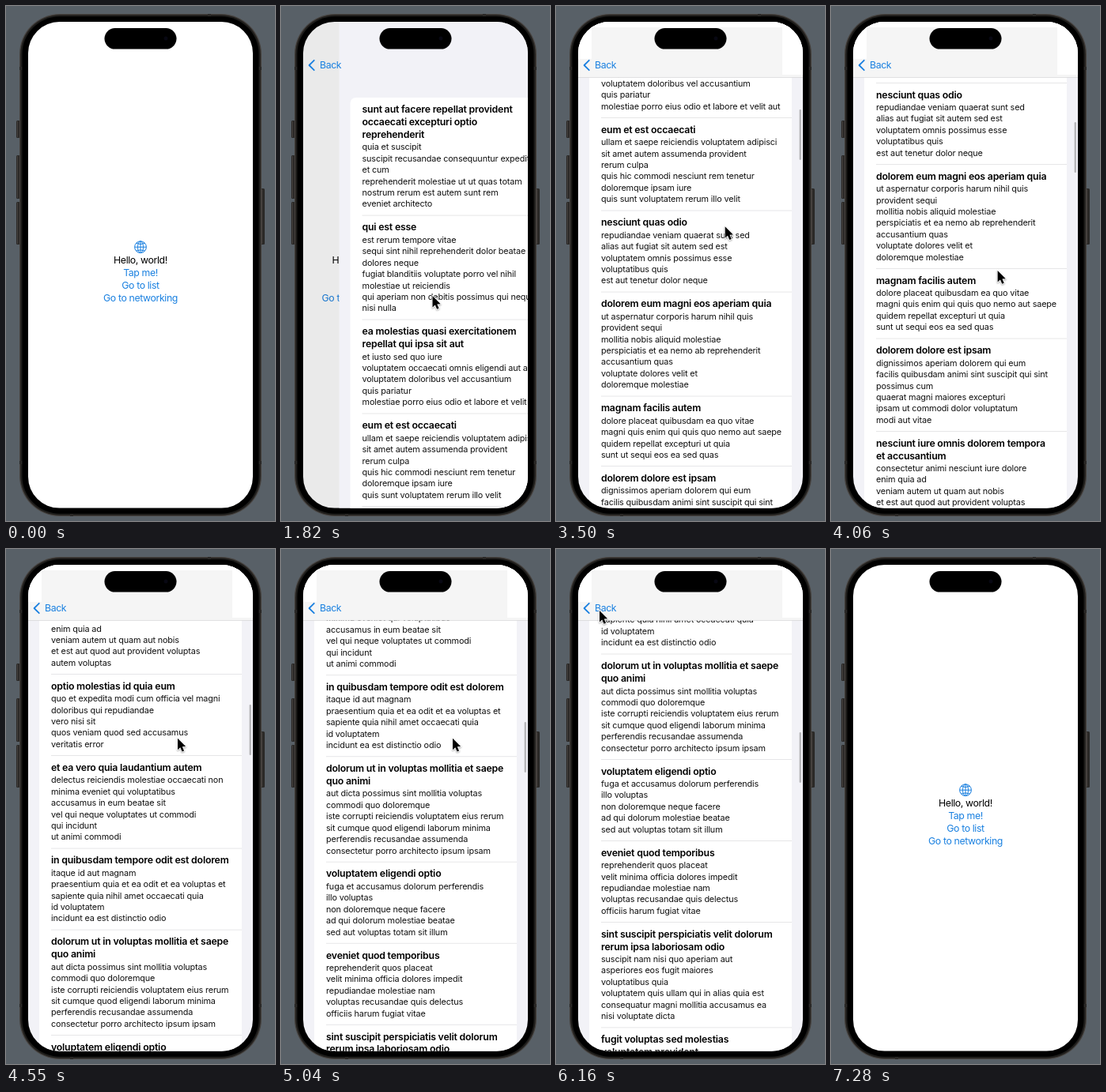
These frames come from a looping animation (340 px wide and 652 px high, 8050 ms). An HTML page with a canvas:

```html
<!DOCTYPE html>
<html lang="en">
<head>
<meta charset="utf-8">
<title>List demo</title>
<style>
html, body { margin: 0; width: 100%; height: 100%; overflow: hidden; background: #586067; }
canvas { display: block; width: 340px; height: 652px; }
</style>
</head>
<body>
<canvas id="stage" width="340" height="652"></canvas>
<script>
const ctx = document.getElementById('stage').getContext('2d');
const LOOP = 8050, STEP = 70;
const LEFT = 28, TOP = 20, WIDTH = 284, HEIGHT = 615.7;
const BLUE = '#1a80e0', GROUPED = '#f2f2f7';
const FACE = 'Inter, Roboto, sans-serif';
const FONT = {
  label: { font: `400 12.3px ${FACE}`, track: '-0.38px' },
  head: { font: `600 12.3px ${FACE}`, track: '-0.2px' },
  body: { font: `400 10.85px ${FACE}`, track: '-0.15px' }
};
const HEAD_LINE = 15.9, BODY_LINE = 14.45, ROW_PAD = 14.9, FIRST_ROW = 131;

// title lines : body lines
const rows = `sunt aut facere repellat provident/occaecati excepturi optio/reprehenderit:quia et suscipit/suscipit recusandae consequuntur expedita/et cum/reprehenderit molestiae ut ut quas totam/nostrum rerum est autem sunt rem/eveniet architecto
qui est esse:est rerum tempore vitae/sequi sint nihil reprehenderit dolor beatae ea/dolores neque/fugiat blanditiis voluptate porro vel nihil/molestiae ut reiciendis/qui aperiam non debitis possimus qui neque/nisi nulla
ea molestias quasi exercitationem/repellat qui ipsa sit aut:et iusto sed quo iure/voluptatem occaecati omnis eligendi aut ad/voluptatem doloribus vel accusantium/quis pariatur/molestiae porro eius odio et labore et velit aut
eum et est occaecati:ullam et saepe reiciendis voluptatem adipisci/sit amet autem assumenda provident/rerum culpa/quis hic commodi nesciunt rem tenetur/doloremque ipsam iure/quis sunt voluptatem rerum illo velit
nesciunt quas odio:repudiandae veniam quaerat sunt sed/alias aut fugiat sit autem sed est/voluptatem omnis possimus esse/voluptatibus quis/est aut tenetur dolor neque
dolorem eum magni eos aperiam quia:ut aspernatur corporis harum nihil quis/provident sequi/mollitia nobis aliquid molestiae/perspiciatis et ea nemo ab reprehenderit/accusantium quas/voluptate dolores velit et/doloremque molestiae
magnam facilis autem:dolore placeat quibusdam ea quo vitae/magni quis enim qui quis quo nemo aut saepe/quidem repellat excepturi ut quia/sunt ut sequi eos ea sed quas
dolorem dolore est ipsam:dignissimos aperiam dolorem qui eum/facilis quibusdam animi sint suscipit qui sint/possimus cum/quaerat magni maiores excepturi/ipsam ut commodi dolor voluptatum/modi aut vitae
nesciunt iure omnis dolorem tempora/et accusantium:consectetur animi nesciunt iure dolore/enim quia ad/veniam autem ut quam aut nobis/et est aut quod aut provident voluptas/autem voluptas
optio molestias id quia eum:quo et expedita modi cum officia vel magni/doloribus qui repudiandae/vero nisi sit/quos veniam quod sed accusamus/veritatis error
et ea vero quia laudantium autem:delectus reiciendis molestiae occaecati non/minima eveniet qui voluptatibus/accusamus in eum beatae sit/vel qui neque voluptates ut commodi/qui incidunt/ut animi commodi
in quibusdam tempore odit est dolorem:itaque id aut magnam/praesentium quia et ea odit et ea voluptas et/sapiente quia nihil amet occaecati quia/id voluptatem/incidunt ea est distinctio odio
dolorum ut in voluptas mollitia et saepe/quo animi:aut dicta possimus sint mollitia voluptas/commodi quo doloremque/iste corrupti reiciendis voluptatem eius rerum/sit cumque quod eligendi laborum minima/perferendis recusandae assumenda/consectetur porro architecto ipsum ipsam
voluptatem eligendi optio:fuga et accusamus dolorum perferendis/illo voluptas/non doloremque neque facere/ad qui dolorum molestiae beatae/sed aut voluptas totam sit illum
eveniet quod temporibus:reprehenderit quos placeat/velit minima officia dolores impedit/repudiandae molestiae nam/voluptas recusandae quis delectus/officiis harum fugiat vitae
sint suscipit perspiciatis velit dolorum/rerum ipsa laboriosam odio:suscipit nam nisi quo aperiam aut/asperiores eos fugit maiores/voluptatibus quia/voluptatem quis ullam qui in alias quia est/consequatur magni mollitia accusamus ea/nisi voluptate dicta
fugit voluptas sed molestias/voluptatem provident:eos voluptas et aut odit natus earum/aspernatur fuga molestiae ullam`
  .split('\n').map(row => row.split(':').map(part => part.split('/')));

let nextTop = FIRST_ROW;
const list = rows.map(([head, body]) => {
  const top = nextTop;
  const height = head.length * HEAD_LINE + body.length * BODY_LINE + ROW_PAD;
  nextTop += height;
  return { head, body, top, height };
});

const clamp = v => Math.max(0, Math.min(1, v));
const mix = (a, b, u) => a + (b - a) * u;
const linear = u => u;
const smooth = u => u * u * (3 - 2 * u);
const easeOut = u => 1 - (1 - u) ** 2.2;
const flick = u => u ** 1.7;
const spring = ms => {
  const u = Math.max(0, ms) * 0.0155;
  return 1 - (1 + u) * Math.exp(-u);
};

// Pointer stops: time, x, y, easing of the move that ends there
const stops = [
  [210, 172, 656, linear],
  [1120, 191.5, 367, easeOut],
  [2520, 191.5, 367, linear],
  [2730, 183, 466, smooth],
  [2870, 183, 466, linear],
  [3130, 213.7, 279.3, linear],
  [3560, 213.7, 279.3, linear],
  [3900, 207, 389, smooth],
  [3950, 207, 389, linear],
  [4150, 217, 239.7, flick],
  [5080, 217, 239.7, linear],
  [5530, 92, 139, smooth],
  [5950, 55, 78, easeOut],
  [6510, 55, 78, linear],
  [7070, 135, 299, u => u * u],
  [7280, 201, 660, linear]
];

function pointerAt(t) {
  const i = stops.findIndex(s => s[0] > t);
  if (i < 1) return null;
  const [t0, x0, y0] = stops[i - 1], [t1, x1, y1, ease] = stops[i];
  const u = ease((t - t0) / (t1 - t0));
  return [mix(x0, x1, u), mix(y0, y1, u)];
}

const glide = (from, reach, ms) => from + reach * (1 - Math.exp(-ms / 540));

function scrollAt(t) {
  if (t < 2870) return 0;
  if (t < 3130) return 187 * (t - 2870) / 260;
  if (t < 3950) return glide(187, 378, t - 3130);
  if (t < 4150) return mix(482, 631.4, flick((t - 3950) / 200));
  return glide(631.4, 771.4, t - 4150);
}

// 0 is the home page, 1 the list page
function pageAt(t) {
  if (t < 1820) return 0;
  if (t < 6300) return spring(t - 1820 + 212);
  return 1 - spring(t - 6300 + 40);
}

function round(x, y, w, h, r, fill) {
  ctx.beginPath();
  ctx.roundRect(x, y, w, h, r);
  ctx.fillStyle = fill;
  ctx.fill();
}

function rect(x, y, w, h, fill) {
  ctx.fillStyle = fill;
  ctx.fillRect(x, y, w, h);
}

function text(str, x, y, style, fill, align = 'left') {
  ctx.font = style.font;
  ctx.letterSpacing = style.track;
  ctx.textAlign = align;
  ctx.fillStyle = fill;
  ctx.fillText(str, x, y);
}

function drawBody() {
  rect(0, 0, 340, 652, '#586067');
  const key = (x, y, h) => {
    round(x, y, 5, h, 1.5, '#2b2927');
    rect(x + 1, y + 1, 1, h - 2, '#45413e');
  };
  key(13, 145, 22);
  key(13, 189, 55);
  key(13, 248, 54);
  key(322, 231, 71);
  round(17, 10, 306, 636, 51, '#45413e');
  round(18.3, 11.2, 303.4, 633.6, 50, '#1e1d1b');
  for (const y of [77, 576]) {
    rect(17, y, 4, 4, '#2a2826');
    rect(319, y, 4, 4, '#2a2826');
  }
  rect(255, 10, 4, 3, '#2a2826');
  rect(81, 643, 4, 3, '#2a2826');
  round(20.5, 13.3, 299, 629.4, 47.5, '#000');
}

function drawGlobe(x, y) {
  const r = 7.4;
  ctx.strokeStyle = BLUE;
  ctx.lineWidth = 1;
  ctx.beginPath();
  ctx.arc(x, y, r, 0, Math.PI * 2);
  ctx.moveTo(x + 3.5, y);
  ctx.ellipse(x, y, 3.5, r, 0, 0, Math.PI * 2);
  ctx.moveTo(x, y - r);
  ctx.lineTo(x, y + r);
  ctx.moveTo(x - r, y);
  ctx.lineTo(x + r, y);
  for (const d of [-1, 1]) {
    ctx.moveTo(x - 5.6, y + d * 4.8);
    ctx.quadraticCurveTo(x, y + d * 2.6, x + 5.6, y + d * 4.8);
  }
  ctx.stroke();
}

function drawHome(page) {
  const x = 170 - page * WIDTH * 0.3;
  rect(LEFT, TOP, WIDTH, HEIGHT, '#fff');
  drawGlobe(x, 305.2);
  ['Hello, world!', 'Tap me!', 'Go to list', 'Go to networking'].forEach((str, i) =>
    text(str, x, 326.2 + i * 16, FONT.label, i ? BLUE : '#000', 'center'));
  rect(LEFT, TOP, WIDTH, HEIGHT, `rgba(0,0,0,${page * 0.1})`);
}

function drawRow(row, y) {
  row.head.forEach((line, i) => text(line, 57, y + 4.1 + i * HEAD_LINE, FONT.head, '#000'));
  const first = y + row.head.length * HEAD_LINE + 3.5;
  row.body.forEach((line, i) => text(line, 57, first + i * BODY_LINE, FONT.body, '#111'));
  rect(57, y + row.height - 15.6, 241, 0.8, '#e0e0e2');
}

function drawBar(alpha) {
  ctx.globalAlpha = alpha;
  rect(LEFT, TOP, WIDTH, 70, '#f5f5f5');
  rect(LEFT, TOP, 17, 47, '#fff');
  rect(LEFT, TOP, WIDTH, 7, '#fff');
  rect(286, TOP, 26, 67, '#fff');
  rect(LEFT, 90, WIDTH, 0.7, '#d4d4d6');
  ctx.globalAlpha = 1;
}

function drawList(page, scroll) {
  ctx.save();
  ctx.translate((1 - page) * WIDTH, 0);
  rect(LEFT, TOP, WIDTH, HEIGHT, GROUPED);
  round(42, 116 - scroll, 256, nextTop, 7, '#fff');
  for (const row of list) {
    const y = row.top - scroll;
    if (y < 652 && y + row.height > 60) drawRow(row, y);
  }
  if (scroll > 0) {
    drawBar(clamp(scroll / 20));
    round(307.6, 93.5 + scroll * 0.1, 2.3, 64, 1.1, '#b4b4b7');
  }
  ctx.restore();
}

function drawBack(page) {
  ctx.globalAlpha = clamp(page * 1.2);
  ctx.strokeStyle = BLUE;
  ctx.lineWidth = 1.8;
  ctx.lineCap = ctx.lineJoin = 'round';
  ctx.beginPath();
  ctx.moveTo(41.8, 68.8);
  ctx.lineTo(35.6, 75);
  ctx.lineTo(41.8, 81.2);
  ctx.stroke();
  text('Back', 49, 79.3, FONT.label, BLUE);
  ctx.globalAlpha = 1;
}

function drawPointer([x, y]) {
  ctx.save();
  ctx.translate(x, y);
  ctx.beginPath();
  [[0, 0], [0, 14.5], [3.3, 11.5], [5.6, 16.8], [8.1, 15.7], [5.8, 10.5], [10.2, 10.3]]
    .forEach(p => ctx.lineTo(...p));
  ctx.closePath();
  ctx.lineJoin = 'round';
  ctx.lineWidth = 1.8;
  ctx.strokeStyle = '#fff';
  ctx.shadowColor = 'rgba(0,0,0,.35)';
  ctx.shadowBlur = 2;
  ctx.shadowOffsetY = 1;
  ctx.stroke();
  ctx.shadowColor = 'transparent';
  ctx.fillStyle = '#000';
  ctx.fill();
  ctx.restore();
}

function draw(t) {
  const page = pageAt(t);
  drawBody();
  ctx.save();
  ctx.beginPath();
  ctx.roundRect(LEFT, TOP, WIDTH, HEIGHT, 39.7);
  ctx.clip();
  if (page < 0.999) drawHome(page);
  if (page > 0.001) {
    drawList(page, scrollAt(t));
    drawBack(page);
  }
  ctx.restore();
  round(124.5, 28, 91, 26.6, 13.3, '#000');
  round(199.5, 38.5, 5, 5, 2.5, '#080812');
  const pointer = pointerAt(t);
  if (pointer) drawPointer(pointer);
}

const start = performance.now();
function tick() {
  const t = (performance.now() - start) % LOOP;
  draw(Math.floor(t / STEP) * STEP);
  requestAnimationFrame(tick);
}
tick();
</script>
</body>
</html>
```
